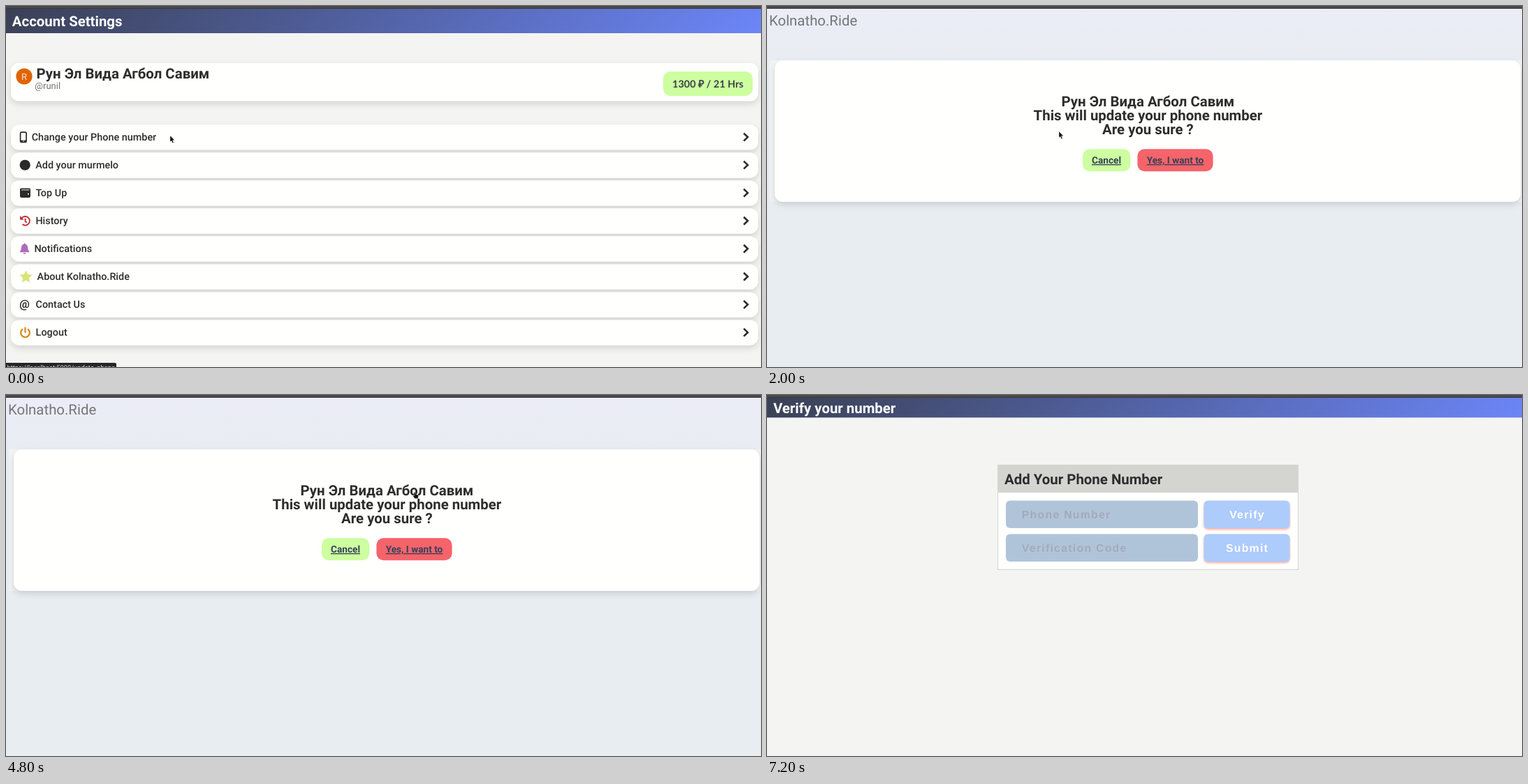
An HTML page for the animation above (8 s loop, 1081x518 px).

```html
<!DOCTYPE html>
<html lang="en">
<head>
<meta charset="utf-8">
<style>
  html, body { margin: 0; width: 100%; height: 100%; overflow: hidden; background: #f4f4f3; }
  svg { display: block; width: 100vw; height: 100vh; }
  text { font-family: Roboto, sans-serif; fill: #2d2d2d; text-rendering: geometricPrecision; white-space: pre; }
  .title { font-size: 20.4px; font-weight: 700; }
  .light { fill: #fff; }
  .mid { text-anchor: middle; }
  .item { font-size: 14.4px; font-weight: 500; }
  .link { font-size: 13.65px; font-weight: 700; fill: #35405a; text-decoration: underline; }
  .price { font: 700 14.4px Lato, sans-serif; fill: #37424a; }
  .form { font: 700 15.8px "Liberation Sans", Arial, sans-serif; letter-spacing: 1.28px; }
  .hint { fill: #a5a9b9; }
  .card { fill: #fffffe; filter: drop-shadow(0 4px 5px rgba(0, 0, 0, .13)); }
  .push { fill: #adcbfb; filter: drop-shadow(0 2px 1.5px rgba(255, 120, 105, .6)); }
  .line { fill: none; stroke: #2b2b2b; }
</style>
</head>
<body>
<svg viewBox="0 0 1081 518" preserveAspectRatio="none">
  <defs>
    <linearGradient id="blue" gradientUnits="userSpaceOnUse" x1="261" y1="-258" x2="819" y2="300">
      <stop stop-color="#3a4054"/><stop offset="1" stop-color="#6c86f8"/>
    </linearGradient>
    <linearGradient id="mist" x2="0" y2="1">
      <stop stop-color="#ececf8"/><stop offset=".15" stop-color="#e8edf2"/>
    </linearGradient>
  </defs>

  <g id="settings">
    <rect width="1081" height="518" fill="#f4f4f3"/>
    <rect width="1081" height="39" fill="url(#blue)"/>
    <text class="title light" x="8.8" y="28.6">Account Settings</text>
    <rect class="card" x="7" y="82" width="1070" height="54.5" rx="11"/>
    <circle cx="26" cy="101" r="11.6" fill="#e06400"/>
    <text class="mid" x="26" y="105.6" font-size="13" style="fill:#fbe6d6">R</text>
    <text class="title" x="43.5" y="104">Рун Эл Вида Агбол Савим</text>
    <text x="41.3" y="119" font-size="13" style="fill:#747474">@runil</text>
    <rect x="941" y="94" width="128" height="35" rx="10" fill="#cdfe9f"/>
    <text class="price mid" x="1005" y="117">1300 ₽ / 21 Hrs</text>
    <g id="menu"></g>
  </g>

  <g id="confirm">
    <rect width="1081" height="518" fill="url(#mist)"/>
    <text x="3" y="28.4" font-size="20.4" style="fill:#747678">Kolnatho.Ride</text>
    <rect x="4" y="78" width="1077" height="203" fill="#f2f3f3"/>
    <rect class="card" x="11" y="78" width="1068" height="203" rx="12"/>
    <g class="mid">
      <text class="title" x="545.4" y="143.6">Рун Эл Вида Агбол Савим</text>
      <text class="title" x="545.4" y="164">This will update your phone number</text>
      <text class="title" x="545.4" y="184.4">Are you sure ?</text>
      <rect x="452" y="205.3" width="68.3" height="32" rx="10" fill="#cdfe9f"/>
      <text class="link" x="486" y="226">Cancel</text>
      <rect x="530.4" y="205.3" width="108.2" height="32" rx="10" fill="#f4646a"/>
      <text class="link" x="584.5" y="226">Yes, I want to</text>
    </g>
  </g>

  <g id="verify">
    <rect width="1081" height="518" fill="#f4f4f3"/>
    <rect width="1081" height="32.4" fill="url(#blue)"/>
    <text class="title light" x="8.9" y="25.7">Verify your number</text>
    <rect x="330.5" y="100.5" width="430" height="150" fill="#fffffe" stroke="#d4d4d2"/>
    <rect x="330" y="100" width="431" height="40" fill="#d4d4d1"/>
    <text class="title" x="340" y="128">Add Your Phone Number</text>
    <g id="fields"></g>
  </g>

  <g id="status">
    <path fill="#262628"/>
    <text x="1.5" y="521.6" font-size="9.35" style="fill:#d8d8d8"></text>
  </g>

  <g id="cursor" stroke="#fff" stroke-opacity=".55" stroke-width=".5" fill="#111">
    <path id="arrow" d="M0 0V9L2 7.2 3.5 10.7 5 10 3.6 6.6H6.3Z"/>
    <path id="hand" d="M-.4 1Q.5-.4 1.3 1L1.5 3.6 5.2 4.3Q6 4.6 6 6L5.2 9.6H.8L-1.8 6.2Q-1.6 5 0 6Z"/>
  </g>
  <rect width="1081" height="4" fill="#4b4a4b"/>
  <rect y="3" width="1081" height="1" fill="#3a393b"/>
</svg>

<script>
const $ = id => document.getElementById(id);

// Menu icons are drawn around the middle line of their row.
const menu = [
  ['Change your Phone number', 36.7,
    '<rect class="line" x="20.6" y="-7" width="8.5" height="14.2" rx="1.4" stroke-width="1.7"/><path class="line" d="M21 5.5H29" stroke-width="2.2"/><circle cx="24.9" cy="5.6" r=".8" fill="#fff"/>'],
  ['Add your murmelo', 42.2, '<circle cx="27.2" r="7.6" fill="#2b2b2b"/>'],
  ['Top Up', 42.6,
    '<rect x="20" y="-6.8" width="15" height="13.4" rx="1.8" fill="#2b2b2b"/><path d="M22-4.4H33.5" stroke="#fff" stroke-width=".9"/><circle cx="32" cy="1.4" r="1" fill="#fff"/>'],
  ['History', 42.4,
    '<path d="M22.3-3.8A6.4 6.4 0 1 1 23.5 5M27.6-3.5V.7L30 2.4" fill="none" stroke="#c7333d" stroke-width="2"/><path d="M20-7.2V-1.6H25.8Z" fill="#c7333d"/>'],
  ['Notifications', 40.4,
    '<path d="M26.6-8Q27.6-8 27.6-6.6Q31.2-5.8 31.2-1.6Q31.2 2 33.2 3.6Q33.4 5 32.4 5H20.8Q19.8 5 20 3.6Q22 2 22-1.6Q22-5.8 25.6-6.6Q25.6-8 26.6-8ZM24.6 5.8H28.6Q28.4 7.6 26.6 7.6T24.6 5.8Z" fill="#ae6cb8"/>'],
  ['About Kolnatho.Ride', 44.6,
    '<path transform="translate(28.5 .5)" d="M0-8.6 2.4-3.3 8.2-2.7 3.9 1.3 5 7 0 4.1-5 7-3.9 1.3-8.2-2.7-2.4-3.3Z" fill="#dbe477" stroke="#dbe477" stroke-linejoin="round"/>'],
  ['Contact Us', 42.5, '<text x="19.3" y="4.6" font-size="16.3" font-weight="700">@</text>'],
  ['Logout', 42.6,
    '<path d="M24-5A6.4 6.4 0 1 0 31-5M27.5-7.6V.6" fill="none" stroke="#d58b15" stroke-width="2.2"/>']
];
$('menu').innerHTML = menu.map(([label, x, icon], i) => `
  <g transform="translate(0 ${188.2 + 40.04 * i})">
    <rect class="card" x="7" y="-18" width="1070" height="36.4" rx="12"/>
    ${icon}
    <text class="item" x="${x}" y="5">${label}</text>
    <path class="line" d="M1056.3-5.6 1062-.1 1056.3 5.4" stroke-width="2.6"/>
  </g>`).join('');

$('fields').innerHTML = [['Phone Number', 'Verify'], ['Verification Code', 'Submit']].map(([hint, label], i) => `
  <g transform="translate(0 ${151.4 + 48 * i})">
    <rect x="342" width="275" height="39.6" rx="6" fill="#b0c4d9"/>
    <text class="form hint" x="364.8" y="25.8">${hint}</text>
    <rect class="push" x="625.5" width="123" height="39.8" rx="6"/>
    <text class="form light mid" x="687.5" y="25.8">${label}</text>
  </g>`).join('');

// Cursor path: time, x, y
const path = [
  [0, 235, 186], [1300, 235, 186], [1500, 239, 185], [1700, 239, 185],
  [1800, 272, 112], [1900, 350, 66], [2000, 418, 180], [2400, 418, 180],
  [2600, 520, 181], [2800, 624, 207], [3000, 604, 213], [4500, 604, 213],
  [4800, 584.5, 139], [4900, 566.5, 97.5], [5000, 563, 88], [6100, 563, 88],
  [6200, 547, 81], [6300, 547, 81], [7100, 431, -5], [7200, 420, -16], [8000, 420, -16]
];
const pages = [[0, 'settings'], [900, 'confirm'], [4900, 'verify']];
// Status bubble: time, width, text
const notes = [
  [0, 158, 'https://localhost:5000/update_phone'],
  [700, 199.5, 'Transferring data from localhost…'],
  [900, 0, ''],
  [2800, 175, 'https://localhost:5000/phone_verification'],
  [4700, 0, '']
];

const current = (list, t) => list.findLast(entry => entry[0] <= t);
const show = (id, on) => { $(id).style.display = on ? '' : 'none'; };

function cursorAt(t) {
  const i = path.findIndex(key => key[0] > t);
  const [t0, x0, y0] = path[i - 1], [t1, x1, y1] = path[i];
  const k = (t - t0) / (t1 - t0);
  return [x0 + (x1 - x0) * k, y0 + (y1 - y0) * k];
}

function draw(now) {
  const t = Math.floor(now % 8000 / 100) * 100; // the screen updates ten times a second
  const page = current(pages, t)[1];
  for (const [, id] of pages) show(id, id === page);

  const [, width, note] = current(notes, t);
  const [bubble, text] = $('status').children;
  show('status', width);
  bubble.setAttribute('d', `M0 512H${Math.max(width - 2, 0)}q2 0 2 2V518H0Z`);
  text.textContent = note;

  const hand = t >= 500 && t < 900 || t >= 2800 && t < 4900;
  show('hand', hand);
  show('arrow', !hand);
  $('cursor').setAttribute('transform', `translate(${cursorAt(t)})`);
  requestAnimationFrame(draw);
}
requestAnimationFrame(draw);
</script>
</body>
</html>
```
